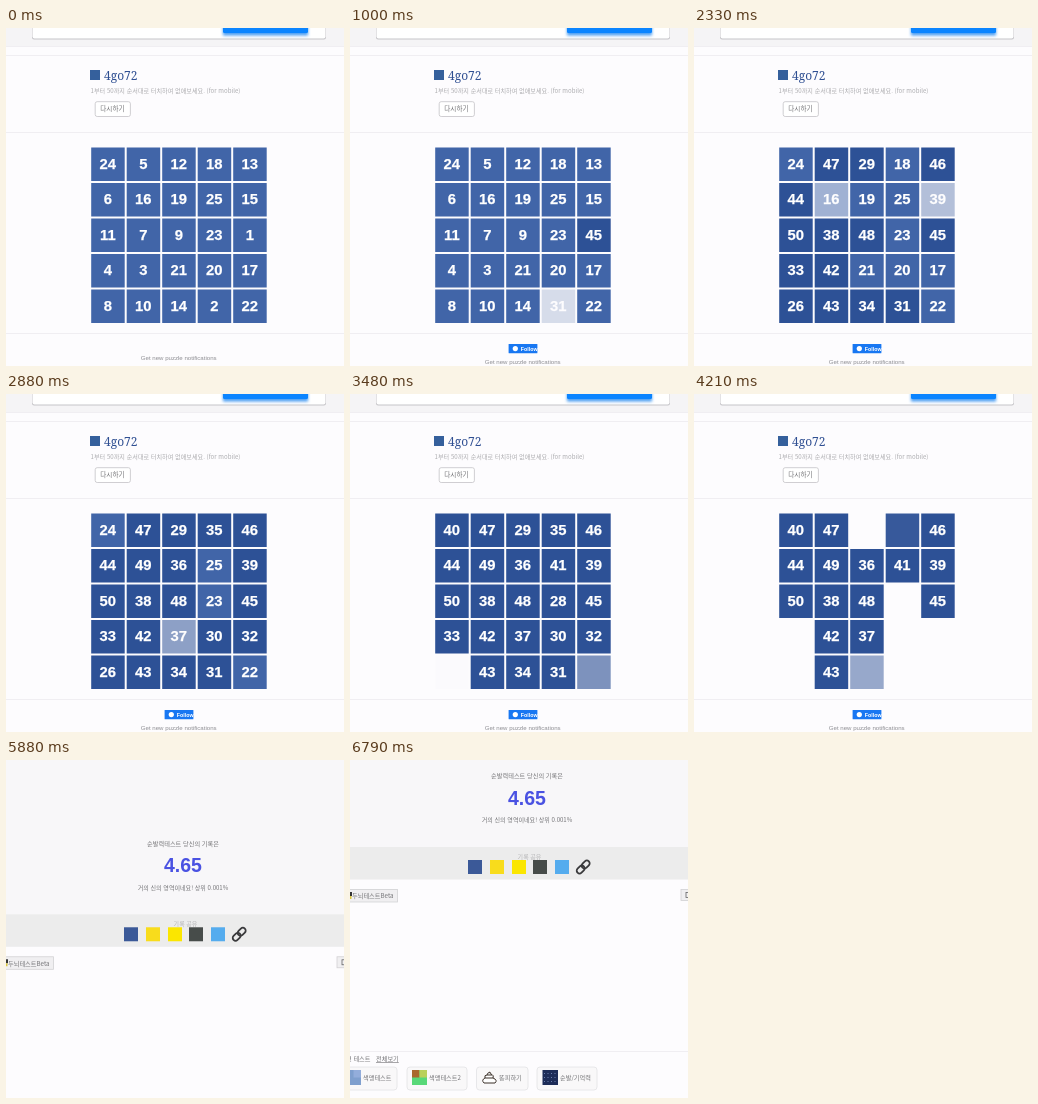
Animation of 338 by 338 pixels, one loop 6.82 s. Source, as an HTML page:

```html
<!DOCTYPE html>
<html lang="ko">
<head>
<meta charset="utf-8">
<title>Number tap game</title>
<style>
html, body { margin: 0; width: 100%; height: 100%; overflow: hidden; background: #fdfcfe; }
svg { display: block; width: 100vw; height: 100vh; }
text { font-family: "Noto Sans CJK KR", "Noto Sans CJK", "Noto Sans CJK JP", sans-serif; font-size: 6.2px; fill: #737376; }
.mid { text-anchor: middle; }
.num { font: bold 14.8px "Liberation Sans", Arial, sans-serif; fill: #fff; stroke: #fff; stroke-width: .25; text-anchor: middle; }
.latin { font-family: "Liberation Sans", Arial, sans-serif; }
.rule { stroke: #f0eef2; stroke-width: 1; }
.pill { fill: #f9f8f9; stroke: #e3e2e5; stroke-width: .8; }
.button { fill: #f0eff1; stroke: #d2d1d4; stroke-width: .8; }
</style>
</head>
<body>
<svg viewBox="0 0 338 338">
  <defs>
    <filter id="soft" x="-20%" y="-50%" width="140%" height="220%"><feGaussianBlur stdDeviation="1.8"/></filter>
  </defs>
  <rect width="338" height="338" fill="#fdfcfe"/>

  <g id="game">
    <rect width="338" height="18" fill="#f5f4f6"/>
    <path class="rule" d="M0 18.5H338M0 27.5H338M0 104.5H338M0 305.5H338"/>
    <rect x="26" y="-8" width="294" height="19.5" rx="2" fill="#c6c5c9"/>
    <rect x="26.5" y="-8" width="293" height="18.5" rx="2" fill="#fff"/>
    <rect x="217" y="-6" width="85" height="13.5" fill="#4a9df2" filter="url(#soft)"/>
    <rect x="217" y="-8" width="85" height="13" rx="1.5" fill="#0a84ff"/>

    <rect x="84" y="42" width="10" height="10" fill="#35609c"/>
    <text x="98" y="52.3" style="font:500 12px 'Noto Serif',serif;fill:#2f4f92">4go72</text>
    <text x="84.6" y="65.4" style="font-size:6.12px;fill:#acacaf">1부터 50까지 순서대로 터치하여 없애보세요. (for mobile)</text>
    <rect x="89.2" y="73.7" width="35.2" height="14.8" rx="2" fill="#fff" stroke="#c4c3c7" stroke-width=".8"/>
    <text class="mid" x="106.4" y="83.4" style="font-size:6.6px">다시하기</text>

    <g id="board"></g>

    <g id="follow">
      <rect x="158.6" y="316" width="28.8" height="9.3" rx=".6" fill="#1877f2"/>
      <circle cx="165.3" cy="320.6" r="2.6" fill="#fff"/>
      <text class="latin" x="170.8" y="322.5" style="font-size:5.3px;font-weight:bold;fill:#fff">Follow</text>
    </g>
    <text id="notice" class="latin mid" x="172.7" style="font-size:6.1px;fill:#8d8d92">Get new puzzle notifications</text>
  </g>

  <g id="result">
    <rect y="-100" width="338" height="187" fill="#f8f7f9"/>
    <text class="mid" x="177" y="18.3">순발력테스트 당신의 기록은</text>
    <text class="latin mid" x="177" y="45" style="font-size:19.5px;font-weight:bold;fill:#4a52e2">4.65</text>
    <text class="mid" x="177" y="62.3" style="font-size:6.05px">거의 신의 영역이네요! 상위 0.001%</text>

    <rect y="87" width="338" height="32.5" fill="#ececec"/>
    <text class="mid" x="179.5" y="98.5" style="font-size:6px;fill:#b4b4b6">기록 공유</text>
    <g id="share"></g>
    <g fill="none" stroke="#3a3a3c" stroke-width="1.9" transform="translate(233.2 107) rotate(-45) scale(.94)">
      <rect x="-8.5" y="-3" width="9.5" height="6" rx="3"/>
      <rect x="-1" y="-3" width="9.5" height="6" rx="3"/>
    </g>

    <rect class="button" x="-20" y="129.5" width="67.5" height="12.5"/>
    <path d="M0 132h2v4h-2z" fill="#333"/>
    <path d="M0 136h1.5v3h-1.5z" fill="#d9c43c"/>
    <text x="2" y="138.3">두뇌테스트Beta</text>
    <rect class="button" x="331" y="129.5" width="30" height="11"/>
    <rect x="336" y="132.5" width="6" height="5" fill="none" stroke="#666" stroke-width=".8"/>

    <path class="rule" d="M0 291.5H338"/>
    <text x="20.5" y="301.3" text-anchor="end">관련 테스트</text>
    <text x="26" y="301.3" text-decoration="underline">전체보기</text>
    <g id="pills"></g>
    <g id="icons">
      <path d="M-4 310h15v15h-15z" fill="#7f9fce"/>
      <path d="M3.5 310h7.5v7.5h-7.5z" fill="#93addb"/>
      <path d="M62 310h15v15h-15z" fill="#58d878"/>
      <path d="M62 310h7.5v7.5h-7.5z" fill="#a9682c"/>
      <path d="M69.5 310h7.5v7.5h-7.5z" fill="#b9d05a"/>
      <path d="M134 323q-3-3 1-5q-1-3 2-3q0-2 3-3q-.5 2 2 2.5q2 1 1 3.5q5 2 2 5zM135 318h8M137 315h5" fill="#fff" stroke="#3b3029" stroke-width="1"/>
      <path d="M192.5 310h15.5v15h-15.5z" fill="#1d2c58"/>
      <path d="M194 313.5h13M194 317.5h13M194 321.5h13" stroke="#6a7fae" stroke-width="1" stroke-dasharray="1 2.5"/>
    </g>
  </g>
</svg>
<script>
const LOOP = 6820, RESULT_AT = 5820, SETTLE = 660, FOLLOW_AT = 330;
const SWAP = 100, VANISH = 200;
const first = [24,5,12,18,13, 6,16,19,25,15, 11,7,9,23,1, 4,3,21,20,17, 8,10,14,2,22];
const second = [40,47,29,35,46, 44,49,36,41,39, 50,38,48,28,45, 33,42,37,30,32, 26,43,34,31,27];

// Known tap moments; taps between them are evenly spaced.
const beats = [[1,620],[2,873],[3,1010],[10,1750],[11,1832],[21,2729],[22,2885],[34,4110],
  [35,4182],[45,4912],[46,4996],[47,5040],[48,5095],[49,5130],[50,5165]];

const $ = id => document.getElementById(id);

function make(parent, tag, attrs, content) {
  const el = document.createElementNS('http://www.w3.org/2000/svg', tag);
  for (const key in attrs) el.setAttribute(key, attrs[key]);
  if (content !== undefined) el.textContent = content;
  return parent.appendChild(el);
}

function tapTime(n) {
  const i = beats.findIndex(b => b[0] >= n);
  const [n1, t1] = beats[i];
  if (n1 === n) return t1;
  const [n0, t0] = beats[i - 1];
  return t0 + (t1 - t0) * (n - n0) / (n1 - n0);
}

// Swing easing, clamped to 0..1
function swing(p) {
  return .5 - Math.cos(Math.PI * Math.min(1, Math.max(0, p))) / 2;
}

const tiles = first.map((n, i) => {
  const x = 85.2 + i % 5 * 35.5, y = 119.5 + Math.floor(i / 5) * 35.5;
  const g = make($('board'), 'g', {});
  const box = make(g, 'rect', { x, y, width: 33.5, height: 33.5 });
  const label = make(g, 'text', { x: x + 16.6, y: y + 21.3, class: 'num' });
  return { g, box, label, n, next: second[i], tap: tapTime(n), end: tapTime(second[i]) };
});

[[118, '#3b5998'], [140, '#f8dc1c'], [162, '#fbe600'], [183, '#474c4a'], [205, '#55acee']]
  .forEach(([x, fill]) => make($('share'), 'rect', { x, y: 100, width: 14, height: 14, fill }));

[[-10, 57, 13, '색맹테스트'], [57, 60, 79, '색맹테스트2'], [126.5, 51.5, 149, '똥피하기'], [187, 60, 210, '순발/기억력']]
  .forEach(([x, width, tx, name]) => {
    make($('pills'), 'rect', { x, y: 307, width, height: 23, rx: 3, class: 'pill' });
    make($('pills'), 'text', { x: tx, y: 320.4 }, name);
  });

function drawTile(tile, t) {
  const fresh = t < tile.tap + SWAP;
  const gone = t >= tile.end;
  const alpha = fresh ? 1 - swing((t - tile.tap) / SWAP)
    : gone ? 1 - swing((t - tile.end) / VANISH)
    : swing((t - tile.tap - SWAP) / SWAP);
  tile.box.setAttribute('fill', fresh ? '#4165a8' : '#2d5196');
  tile.label.textContent = fresh ? tile.n : gone ? '' : tile.next;
  tile.g.setAttribute('opacity', alpha);
}

function draw() {
  const t = performance.now() % LOOP;
  const done = t >= RESULT_AT;
  $('game').style.display = done ? 'none' : '';
  $('result').style.display = done ? '' : 'none';
  if (done) {
    const left = Math.max(0, 1 - (t - RESULT_AT) / SETTLE);
    $('result').setAttribute('transform', `translate(0 ${90 * left ** 3})`);
  } else {
    // The follow button pushes the notice down when it loads.
    const loaded = t >= FOLLOW_AT;
    $('follow').style.display = loaded ? '' : 'none';
    $('notice').setAttribute('y', loaded ? 335.5 : 332);
    tiles.forEach(tile => drawTile(tile, t));
  }
  requestAnimationFrame(draw);
}
draw();
</script>
</body>
</html>
```
